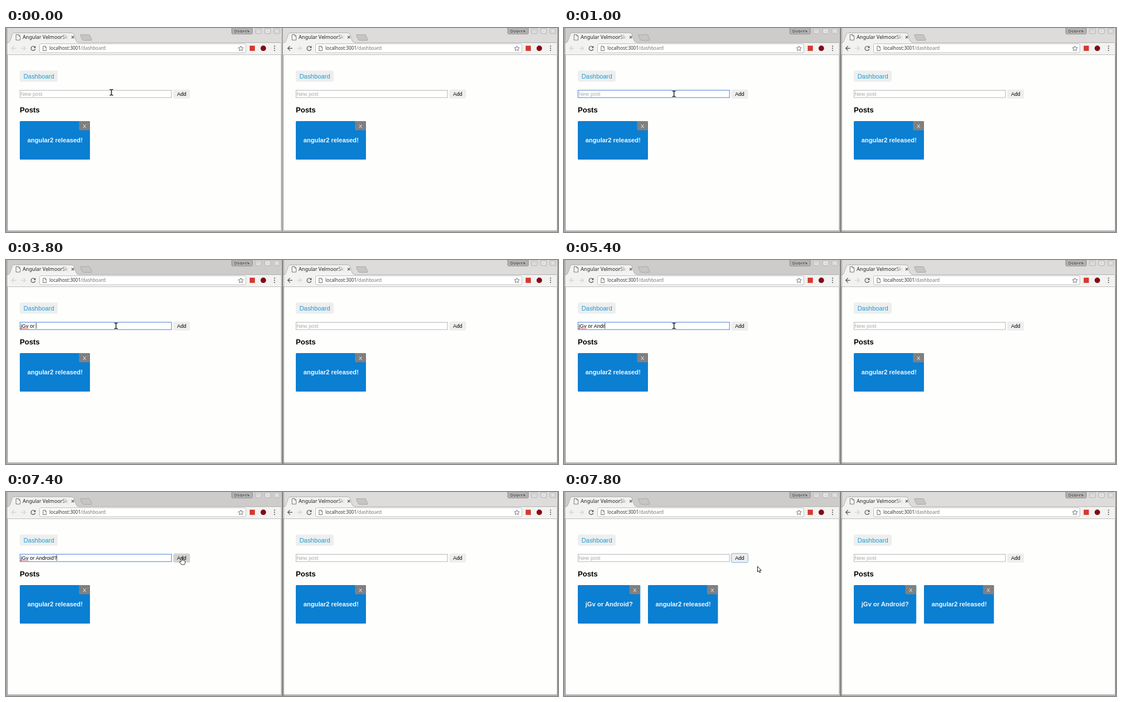
Recreate the animation shown at these times as an HTML page. Size 960 by 355 pixels, loop 8000 ms.

```html
<!DOCTYPE html>
<html lang="en">
<head>
<meta charset="utf-8">
<title>Shared dashboard</title>
<style>
  html, body { margin: 0; width: 100%; height: 100%; overflow: hidden; background: #cfcecc; }
  svg { display: block; }
  text { font-family: "Liberation Sans", Arial, sans-serif; font-size: 9.07px; white-space: pre; }
  .ui { font-family: "Noto Sans", "Open Sans", sans-serif; font-size: 8px; fill: #333; }
  .title { font-size: 8.7px; fill: #222; }
  .user { font-size: 7.6px; font-weight: 700; fill: #444; text-anchor: middle;
          stroke: #e4e4e3; stroke-width: 1.2; paint-order: stroke; }
  .mid { text-anchor: middle; }
  .link { font-size: 10.88px; fill: #1a9ed9; }
  .head { font-size: 12.73px; font-weight: 700; }
  .post { font-size: 10.88px; font-weight: 700; fill: #f1f6fb; }
  .line { fill: none; stroke: #555; stroke-width: 1.2; }
  .thin { fill: none; stroke: #666; stroke-width: .9; }
  .off { stroke: #d2d2d2; }
  .btn { fill: #eee; }
  .strip { fill: #dddcdb; }
  .active .strip { fill: #cdccca; }
  .field { fill: #fff; stroke: #a0a0a0; stroke-width: .75; }
  .focused .field { stroke: #5f8cd8; stroke-width: 1.1; }
</style>
</head>
<body>
<svg id="stage" width="960" height="355" viewBox="0 0 960 355">
  <defs>
    <linearGradient id="fade">
      <stop stop-color="#f2f2f1" stop-opacity="0"/><stop offset="1" stop-color="#f2f2f1"/>
    </linearGradient>
    <clipPath id="tabClip"><rect x="28" y="8" width="82" height="16"/></clipPath>
  </defs>
</svg>
<script>
const LOOP = 8000;
const POST = "jGv or Android?";
const OLD_POST = "angular2 released!";
const stage = document.getElementById("stage");

const card = (x, w, text) => `
  <rect x="${x}" y="162" width="${w}" height="67" rx="1.5" fill="#0b7fd2"/>
  <path d="M${x + w - 19} 162h18.5v16h-16.5q-2 0-2-2z" fill="#808080"/>
  <text class="mid" x="${x + w - 9.6}" y="173.6" fill="#f0f0f0">X</text>
  <text class="post" x="${x + 13.2}" y="199">${text}</text>`;

const tab = "M2 25.5H4Q6 25 7 22L11 11Q12 8.5 14 8.5H114Q117 8.5 118 11L122 22Q123 25 126 25.5H478";

const chrome = canGoBack => `
  <rect width="480" height="355" fill="#cbcac8"/>
  <rect class="strip" x="2" width="477" height="26"/>
  <path d="${tab}V46.5H2Z" fill="#f2f2f1"/>
  <path d="${tab}" fill="none" stroke="#a9a8a6" stroke-width=".8"/>
  <path d="M130 11.5h14q1.5 0 2 1.5l3 7q.5 1.5-1 1.5h-13q-2 0-2.5-1.5l-3-7q-.5-1.5.5-1.5z" fill="#c6c5c3" stroke="#a3a2a0" stroke-width=".8"/>
  <path d="M17.5 11.5h4.5l2.5 2.5v7h-7zM22 11.5v2.5h2.5" fill="#fff" stroke="#666" stroke-width=".9"/>
  <text class="ui title" x="29" y="19.3" clip-path="url(#tabClip)">Angular VelmoorSky</text>
  <rect x="96" y="10" width="14" height="14" fill="url(#fade)"/>
  <path class="line" d="m114 13.8 4.4 4.4m0-4.4-4.4 4.4"/>
  <path d="M392.5 0V8.5q0 2 2 2h32q2 0 2-2V0" fill="#b0afad" stroke="#908f8d" stroke-width=".9"/>
  <text class="ui user" x="410.5" y="8.2">Dobrek</text>
  ${[433, 449, 465].map(x => `<rect x="${x + .5}" y=".5" width="11" height="9.5" rx="1.5" fill="#d6d5d3" stroke="#b8b7b5" stroke-width=".8"/>`).join("")}
  <path d="M436.5 7h5M452.5 3.5h5v4h-5zm16.5 0 4 4m0-4-4 4" fill="none" stroke="#f4f4f4"/>
  <path class="line ${canGoBack ? "" : "off"}" d="M18 35.3H10m4-4-4 4 4 4"/>
  <path class="line off" d="M26 35.3h8m-4-4 4 4-4 4"/>
  <path class="line" d="M50 33A3.7 3.7 0 1 0 50.8 36.5"/>
  <path d="M51.5 31v3.7h-3.7z" fill="#555"/>
  <rect x="58.5" y="27.5" width="358.5" height="15.5" rx="2" fill="#fff" stroke="#b9b9b9" stroke-width=".9"/>
  <path class="thin" d="M64.5 31.5h3.5l2 2v6h-5.5zM68 31.5v2h2"/>
  <text class="ui" x="75.5" y="38.3">localhost:3001<tspan fill="#777">/dashboard</tspan></text>
  <path class="thin" d="m408.5 31 1.3 3 3.2.3-2.4 2.1.7 3.2-2.8-1.7-2.8 1.7.7-3.2-2.4-2.1 3.2-.3z"/>
  <rect x="423.8" y="30.8" width="9" height="9" fill="#d5392f"/>
  <circle cx="447.5" cy="35.3" r="4.8" fill="#800c18"/>
  ${[31.6, 35.3, 39].map(y => `<circle cx="467" cy="${y}" r="1" fill="#555"/>`).join("")}
  <rect x="3" y="47" width="475" height="305" fill="#fefefd"/>
  <path d="M2 46.5H478" stroke="#c0bfbd"/>
  <path d="M2.5 47V352.5H478.5V47" fill="none" stroke="#b4b3b1"/>
  <path d="M1 354.5H480" stroke="#a3a2a0"/>`;

const page = `
  <rect class="btn" x="24" y="74" width="66" height="19.5" rx="3"/>
  <text class="link" x="30.5" y="87.8">Dashboard</text>
  <rect class="field" x="24.3" y="108.3" width="263.5" height="12.8"/>
  <text class="entry" x="25.5" y="117.9" fill="#a9a9a9">New post</text>
  <rect class="btn add" x="291" y="107" width="29" height="15.7" rx="2.5"/>
  <text class="mid" x="305.6" y="118.2">Add</text>
  <text class="head" x="24" y="147.3">Posts</text>
  <g class="before">${card(24, 122, OLD_POST)}</g>
  <g class="after">${card(24, 108.6, POST)}${card(146, 121.7, OLD_POST)}</g>`;

const beam = "M-3-5Q0-5 0-3.5Q0-5 3-5M0-3.5V4M-3 5Q0 5 0 3.5Q0 5 3 5";

stage.insertAdjacentHTML("beforeend", `
  <g id="left">${chrome(false)}${page}</g>
  <g transform="translate(480)">${chrome(true)}${page}</g>
  <path d="M1.5 0V355M480.5 0V355M959.5 0V355" stroke="#858482"/>
  <g id="shadow">
    <path d="M480.5 0V355" stroke="#5e5d5b"/>
    <path d="M482.5 0V355" stroke="#000" stroke-opacity=".17" stroke-width="3"/>
  </g>
  <path id="squiggle" d="M25.5 119.5q.85-1.2 1.7 0t1.7 0 1.7 0 1.7 0 1.7 0 1.7 0 1.7 0 1.7 0" fill="none" stroke="#e02020" stroke-width=".75"/>
  <path id="caret" d="M0 109.5V119.5" stroke="#000" stroke-width=".8"/>
  <g id="pointer">
    <g data-shape="beam" fill="none">
      <path d="${beam}" stroke="#fff" stroke-width="2.6"/>
      <path d="${beam}" stroke="#111" stroke-width="1.3"/>
    </g>
    <path data-shape="arrow" d="M.5.5V10L2.7 8 4.2 11.5 5.8 10.8 4.3 7.4H7.2Z" fill="#fff" stroke="#222"/>
    <path data-shape="hand" d="M-1.5 6.5V0q0-1.2 1-1.2T.5 0V4q1.5-1.2 2 .3 1.3-.8 1.6.5 1.4-.5 1.4 1V8q0 1.5-1 3.2h-5.5L-4 7.5q-.8-2 1-1.5z" fill="#fff" stroke="#222" stroke-width=".9"/>
  </g>`);

const $ = s => stage.querySelector(s);
const show = (el, on) => el.style.display = on ? "" : "none";
const left = $("#left"), entry = $(".entry"), add = $(".add");
const shadow = $("#shadow"), squiggle = $("#squiggle"), caret = $("#caret"), pointer = $("#pointer");

// [time, letters typed]
const typing = [[0, 0], [1600, 1], [2200, 2], [2400, 3], [2800, 4], [3000, 5], [3400, 6], [3800, 7],
  [4000, 8], [4400, 9], [4800, 10], [5400, 11], [5800, 12], [6000, 14], [6200, 15], [7800, 0]];
// [time, x, y, cursor]
const moves = [[0, 183.3, 112, "beam"], [800, 191.3, 114.5, "beam"], [6600, 653, 17, "arrow"], [6800, 504, 61, "arrow"],
  [7000, 420, 88, "arrow"], [7200, 345, 108, "arrow"], [7400, 306, 115, "hand"], [7800, 336, 129, "arrow"]];
const at = (steps, t) => steps.findLast(s => s[0] <= t);

function render(t) {
  const typed = at(typing, t)[1];
  const active = t >= 400;
  const focused = active && t < 7600;
  const posted = t >= 7800;
  const [, x, y, shape] = at(moves, t);

  left.classList.toggle("active", active);
  left.classList.toggle("focused", focused);
  show(shadow, active);

  entry.textContent = typed ? POST.slice(0, typed) : "New post";
  entry.setAttribute("fill", typed ? "#000" : "#a9a9a9");
  show(squiggle, focused && typed > 3);
  show(caret, focused && (t < 1000 || t >= 1600));
  const end = typed ? entry.getComputedTextLength() : 0;
  caret.setAttribute("transform", `translate(${25.7 + end})`);

  add.style.fill = t >= 7400 && !posted ? "#d3d3d3" : "#eee";
  add.style.stroke = t >= 7600 ? "#7eaee8" : "none";
  stage.querySelectorAll(".before").forEach(g => show(g, !posted));
  stage.querySelectorAll(".after").forEach(g => show(g, posted));

  pointer.setAttribute("transform", `translate(${x} ${y})`);
  for (const el of pointer.children) show(el, el.dataset.shape === shape);
}

const start = performance.now();
function tick() {
  render((performance.now() - start) % LOOP);
  requestAnimationFrame(tick);
}
tick();
</script>
</body>
</html>
```
